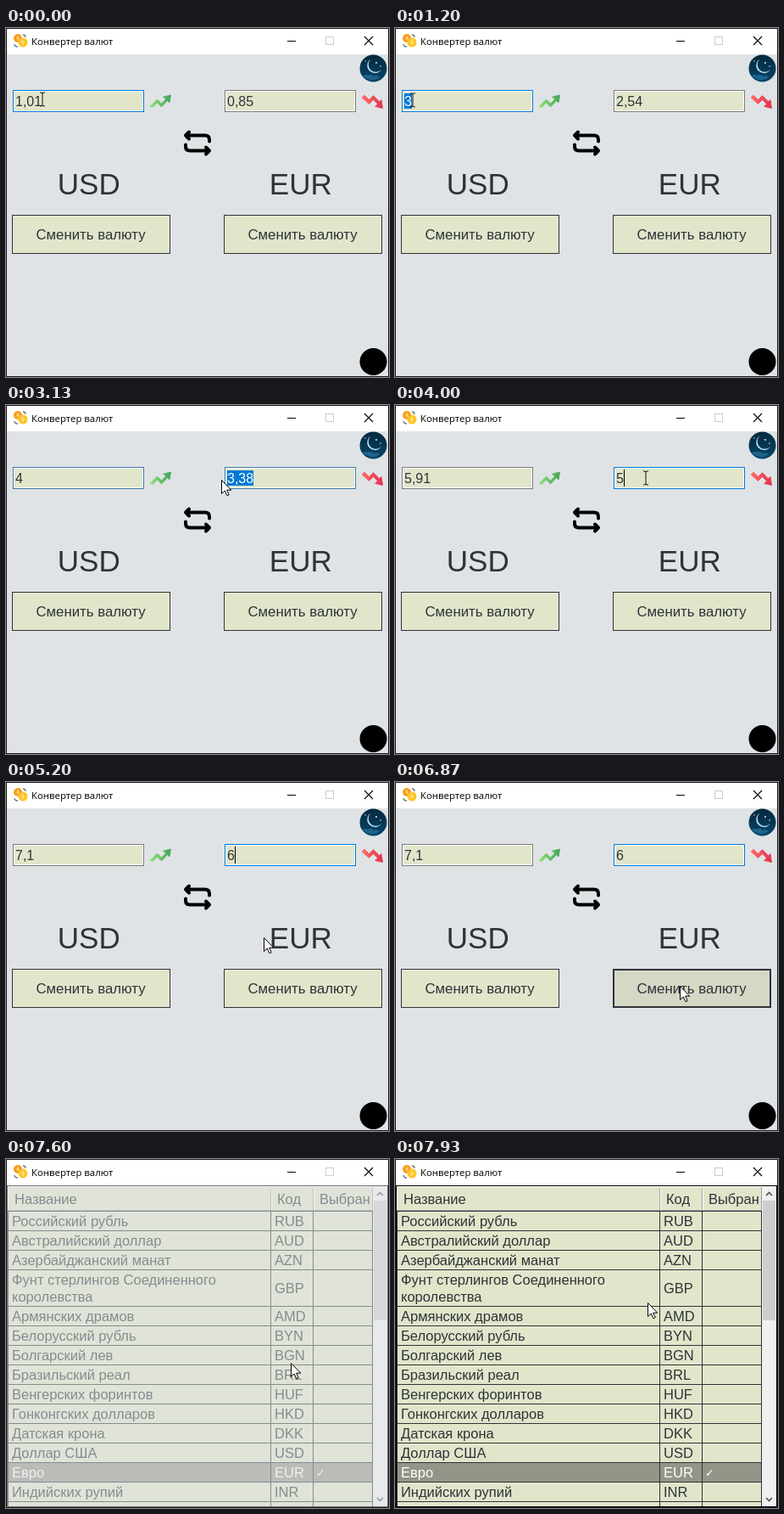
Recreate the animation shown at these times as an HTML page. Size 452 by 411 pixels, loop 8 s.

```html
<!DOCTYPE html>
<html lang="ru">
<head>
<meta charset="utf-8">
<title>Конвертер валют</title>
<style>
  html, body { margin: 0; width: 100%; height: 100%; overflow: hidden; background: #dfe3e6; }
  svg { display: block; }
  text { font: 16px "Liberation Sans", Arial, sans-serif; fill: #2e3338; white-space: pre; }
  #list text { font-size: 16.5px; }
  .caption { font: 11.4px "Open Sans", "Noto Sans", sans-serif; fill: #000; }
  .currency { font-size: 35px; text-anchor: middle; }
  .action { font-size: 16.8px; text-anchor: middle; }
  #list .picked, .picked { fill: #fff; }
  #list .tick { font: 13px "DejaVu Sans", sans-serif; fill: #fff; }
  .line { fill: none; stroke: #2e3338; }
  rect, .line { shape-rendering: crispEdges; }
</style>
</head>
<body>
<svg id="stage" width="452" height="411" viewBox="0 0 452 411">
  <defs>
    <linearGradient id="up"><stop stop-color="#8ce071"/><stop offset="1" stop-color="#45a35a"/></linearGradient>
    <linearGradient id="down"><stop stop-color="#ff6c66"/><stop offset="1" stop-color="#e5304f"/></linearGradient>
    <linearGradient id="night" x2="0" y2="1"><stop stop-color="#02293d"/><stop offset="1" stop-color="#08456a"/></linearGradient>
    <linearGradient id="moonlight" x2="0" y2="1"><stop stop-color="#f4fbff"/><stop offset="1" stop-color="#a5d5ee"/></linearGradient>
  </defs>
  <rect width="452" height="411" fill="#dfe3e6"/>

  <g id="converter">
    <g id="left"></g>
    <g id="right"></g>

    <path d="M170 92.500l8.500-8.500 5 5 5-5-3-3 9-2-1.500 9-2.500-2.300-7 7.300-5-5-5.500 5.500z" fill="url(#up)" stroke="url(#up)" stroke-width=".8"/>
    <path d="M420 82l3-3 5.500 5.500 5-5 7 7.300 2.500-2.300 1.500 10-9-2 3-3-5-5-5 5z" fill="url(#down)" stroke="url(#down)" stroke-width=".8"/>

    <g fill="none" stroke="#000" stroke-width="4" stroke-linecap="round" stroke-linejoin="round">
      <path id="bend" d="M216 122.500l-4 4 4 4M212 126.500H235Q240 126.500 240 131.500V133.500"/>
      <use href="#bend" transform="rotate(180 226 135.500)"/>
    </g>

    <circle cx="433.500" cy="47.500" r="16" fill="url(#night)"/>
    <path d="M430 37A9 9 0 1 0 443 49A8.500 8.500 0 0 1 430 37Z" fill="url(#moonlight)"/>
    <path d="M421 57q3-4 6-1q4-3 7 1q4-2 7 1q-8 7-20-1z" fill="#1d648c"/>
    <g fill="#d5edf8">
      <circle cx="437" cy="41" r="1"/><circle cx="442" cy="45" r=".8"/><circle cx="424" cy="39" r=".7"/>
    </g>
    <circle cx="433.500" cy="393" r="16" fill="#000"/>
  </g>

  <g id="list">
    <rect x="2" y="32" width="431" height="377" fill="#e1e6cb"/>
    <rect x="433" y="32" width="17" height="377" fill="#f0f0f0"/>
    <rect x="434" y="49" width="15" height="141" fill="#cdcdcd"/>
    <path d="M438 43l3.500-3.500 3.500 3.500M438 399l3.500 3.500 3.500-3.500" fill="none" stroke="#505050" stroke-width="1.600"/>
    <path class="line" d="M2.500 60V32.500H433M313.500 35V60M363.500 35V60" style="stroke:#fff"/>
    <path class="line" d="M3 60.500H432.500V33M312.500 35V60M362.500 35V60" style="stroke:#a0a0a0"/>
    <text x="10" y="53">Название</text>
    <text x="320" y="53">Код</text>
    <text x="370" y="53">Выбран</text>
    <g id="rows"></g>
    <path class="line" d="M2.500 61V409M312.500 61V409M362.500 61V409M432.500 61V409"/>
    <rect x="1.500" y="31.500" width="449" height="378" fill="none" stroke="#000"/>
  </g>

  <rect x="1" y="1" width="450" height="30" fill="#fff"/>
  <circle cx="14" cy="12" r="5" fill="#f99d1c"/>
  <circle cx="20" cy="17" r="5.500" fill="#ffc526"/>
  <path d="M14 9.500v5M12.500 12h3M20 14v6M18 17h4" stroke="#fff0ba" fill="none"/>
  <path d="M20 8q3 0 3 3M10 19q0 3 4 3" stroke="#66747c" stroke-width="1.300" fill="none"/>
  <text class="caption" x="30" y="20">Конвертер валют</text>
  <path d="M332 15.500h10" stroke="#000"/>
  <rect x="377.500" y="10.500" width="9" height="9" fill="none" stroke="#ccc"/>
  <path d="M423 10l10 10M433 10l-10 10" stroke="#000" stroke-width="1.100"/>
  <rect x=".5" y=".5" width="451" height="410" fill="none" stroke="#1a1a1a"/>

  <g id="pointer">
    <path id="beam" d="M-3-8H-1L0-7 1-8H3M0-7V7M-3 8H-1L0 7 1 8H3" fill="none" stroke="#111"/>
    <path id="arrow" d="M.5.500V16.500L4.200 13 6.900 18.700 9.200 17.700 6.600 12.200H11.700Z" fill="#fff" stroke="#000"/>
  </g>
</svg>
<script>
const LOOP = 8000, TICK = 200 / 3;
const byId = id => document.getElementById(id);

function add(parent, tag, attrs, text = '') {
  const node = document.createElementNS('http://www.w3.org/2000/svg', tag);
  for (const key in attrs) node.setAttribute(key, attrs[key]);
  node.textContent = text;
  return parent.appendChild(node);
}

// Each step is [time, value, easing towards the next step].
function play(node, prop, steps) {
  const frames = steps.map(([time, value, easing = 'steps(1)']) =>
    ({ offset: Math.max(0, time - 4) / LOOP, [prop]: value, easing }));
  frames.push({ offset: 1, [prop]: steps.at(-1)[1] });
  node.animate(frames, { duration: LOOP, iterations: Infinity });
}

function show(node, ...spans) {
  const steps = spans.flatMap(([from, to]) => to < LOOP ? [[from, 1], [to, 0]] : [[from, 1]]);
  if (steps[0][0] > 0) steps.unshift([0, 0]);
  play(node, 'opacity', steps);
}

function panel(id, x, code, values, carets) {
  const root = byId(id);
  add(root, 'rect', { x: x + 1, y: 73, width: 155, height: 26, fill: '#fff' });
  add(root, 'rect', { x: x + 3, y: 75, width: 151, height: 22, fill: '#e1e6cb' });
  const border = add(root, 'rect', { x: x + 1.5, y: 73.5, width: 154, height: 25, fill: 'none' });
  // A value is shown from start to end and highlighted from the moment of selection.
  for (const [text, start, end, selected = end] of values) {
    show(add(root, 'text', { x: x + 4, y: 92 }, text), [start, selected]);
    if (selected === end) continue;
    const mark = add(root, 'g', {});
    add(mark, 'rect', { x: x + 4, y: 77, width: text.length > 1 ? 31 : 9, height: 18, fill: '#0078d7' });
    add(mark, 'text', { x: x + 4, y: 92, class: 'picked' }, text);
    show(mark, [selected, end]);
  }
  show(add(root, 'rect', { x: x + 13, y: 76, width: 1, height: 20, fill: '#000' }), ...carets);
  add(root, 'text', { x: x + 90.8, y: 196, class: 'currency' }, code);
  const face = add(root, 'rect', { x: x + .5, y: 220.5, width: 186, height: 45, fill: '#e1e6cb', stroke: '#2e3338' });
  const focus = add(root, 'rect', { x: x + 1, y: 221, width: 185, height: 44, fill: 'none', stroke: '#2e3338', 'stroke-width': 2 });
  add(root, 'text', { x: x + 93, y: 249, class: 'action' }, 'Сменить валюту');
  return { border, face, focus };
}

const left = panel('left', 7, 'USD',
  [['1,01', 0, 470, 70], ['3', 470, 2070, 1130], ['4', 2070, 3670], ['5,91', 3670, 4870], ['7,1', 4870, LOOP]],
  [[470, 1000], [2070, 2600]]);
const right = panel('right', 257, 'EUR',
  [['0,85', 0, 470], ['2,54', 470, 2070], ['3,38', 2070, 3670, 3000], ['5', 3670, 4870, 4600], ['6', 4870, LOOP]],
  [[3670, 4200], [4870, 5400], [5930, 6470]]);

const BLUE = '#0078d7', GREY = '#7a7a7a';
play(left.border, 'stroke', [[0, BLUE], [2930, BLUE, 'steps(6)'], [3330, GREY]]);
play(right.border, 'stroke', [[0, GREY], [2930, GREY, 'steps(6)'], [3330, BLUE], [6870, BLUE, 'steps(4)'], [7130, GREY]]);
play(right.face, 'fill', [[0, '#e1e6cb'], [5670, '#d4d8c4']]);
left.focus.remove();
show(right.focus, [6870, LOOP]);

const currencies = `Российский рубль,RUB;Австралийский доллар,AUD;Азербайджанский манат,AZN
Фунт стерлингов Соединенного|королевства,GBP;Армянских драмов,AMD;Белорусский рубль,BYN
Болгарский лев,BGN;Бразильский реал,BRL;Венгерских форинтов,HUF;Гонконгских долларов,HKD
Датская крона,DKK;Доллар США,USD;Евро,EUR;Индийских рупий,INR`.split(/[;\n]/);
const rows = byId('rows');
const rule = y => add(rows, 'path', { d: `M3 ${y + .5}H433`, class: 'line' });
let rowTop = 61;
for (const entry of currencies) {
  const [name, code] = entry.split(','), lines = name.split('|');
  const height = lines.length > 1 ? 43 : 23, chosen = code === 'EUR';
  const style = chosen ? 'picked' : '';
  if (chosen) {
    add(rows, 'rect', { x: 3, y: rowTop, width: 430, height, fill: '#949588' });
    add(rows, 'text', { x: 366, y: rowTop + 17, class: 'tick' }, '✓');
  }
  rule(rowTop);
  lines.forEach((line, i) => add(rows, 'text', { x: 7, y: rowTop + 18 + 20 * i, class: style }, line));
  add(rows, 'text', { x: 317, y: rowTop + height / 2 + 6.5, class: style }, code);
  rowTop += height;
}
rule(rowTop);

play(byId('converter'), 'opacity', [[0, 1], [6870, 1, 'steps(9)'], [7470, 0]]);
play(byId('list'), 'opacity', [[0, 0], [7540, 0, 'steps(2)'], [7670, 1]]);

const route = [
  [0, 43, 84], [130, 16, 85], [670, 16, 85], [870, 33, 81], [1000, 33, 83], [1330, 13, 86],
  [1530, 13, 86], [1930, 93, 86], [2200, 93, 86], [2400, 188, 87], [2870, 298, 87], [2930, 298, 87],
  [3130, 254, 88], [3470, 254, 88], [3870, 296, 86], [4270, 296, 86], [4600, 262, 86], [4870, 262, 86],
  [5200, 304, 183], [5930, 336, 240], [7670, 336, 240], [7930, 298, 169]
];
play(byId('pointer'), 'transform', route.map(([time, x, y], i) => {
  const next = route[i + 1]?.[0] ?? LOOP;
  return [time, `translate(${x}px, ${y}px)`, `steps(${Math.max(1, Math.round((next - time) / TICK))})`];
}));
show(byId('beam'), [0, 470], [670, 2070], [2270, 2400], [2730, 3130], [3530, 4930]);
show(byId('arrow'), [2400, 2730], [3130, 3530], [4930, LOOP]);
</script>
</body>
</html>
```
